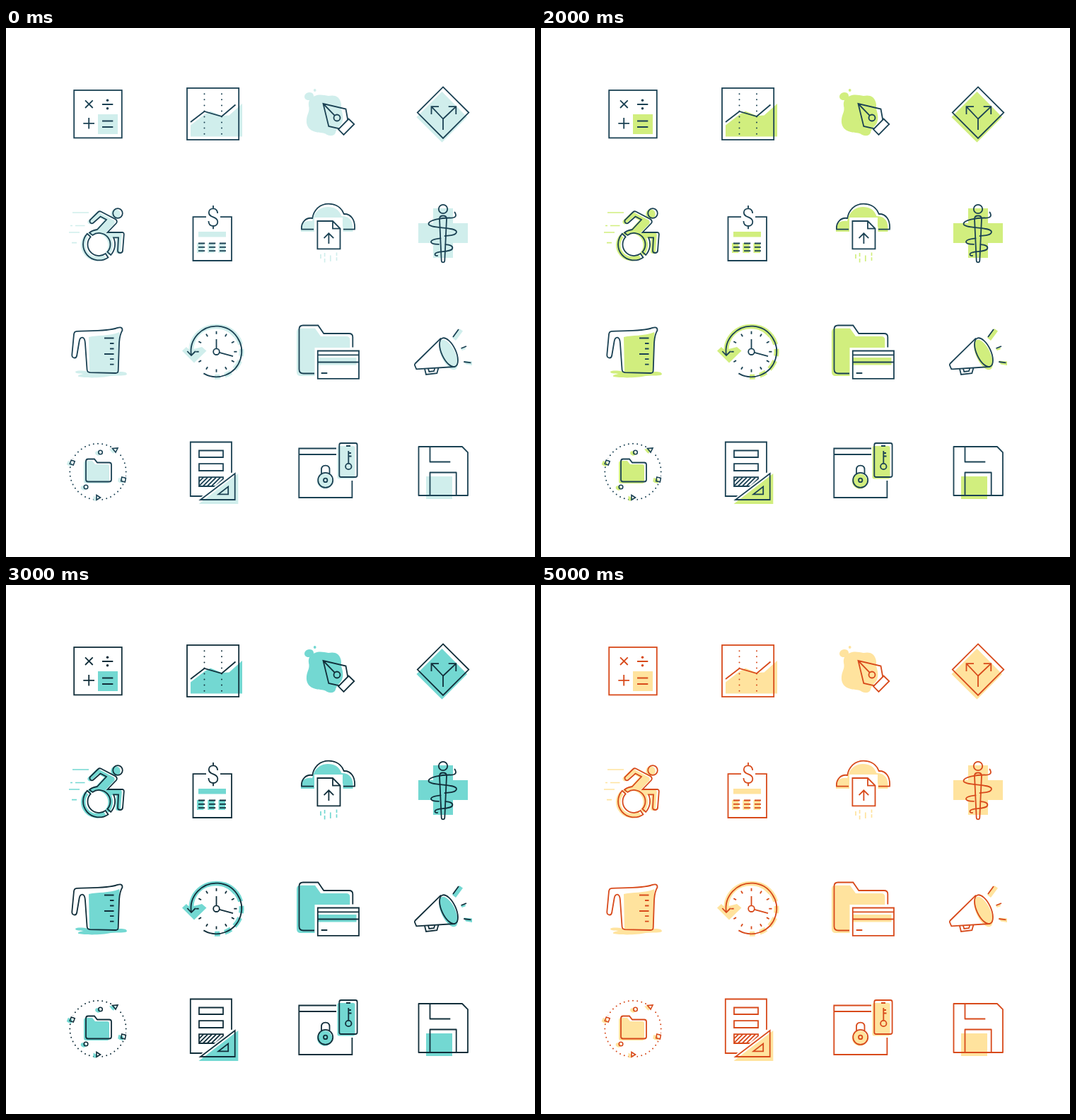
An HTML page that plays this animation: 748 px wide and 748 px high, repeating every 6000 ms.

```html
<!DOCTYPE html>
<html lang="en">
<head>
<meta charset="utf-8">
<title>Icon set colour themes</title>
<style>
  html, body { margin: 0; width: 100%; height: 100%; overflow: hidden; background: #fff; }
  svg { display: block; width: 100%; height: 100%; }
  .line { fill: none; stroke: var(--line); stroke-width: 1.8; }
  .tint { fill: var(--tint); stroke: none; }
  .tint-line { fill: none; stroke: var(--tint); stroke-width: 1.7; }
  .paper { fill: #fff; stroke: none; }
  .dots { stroke-width: 2; stroke-linecap: round; }
  .solid { fill: var(--line); stroke: none; }
  .round { stroke-linejoin: round; stroke-linecap: round; }
</style>
</head>
<body>
<svg id="stage" viewBox="0 0 748 748">
  <defs>
    <path id="chair" d="M122.3 292.9L118 289.5Q122 286 129 285L142 271L133.5 266.5L123.5 275.5Q121 277.5 119 275Q117.5 272.5 119.5 270.8L130 260.5Q132 258.5 134.5 259.8L155 270.5Q158 273 156 276L143.5 289L164 288.8Q167 289 166.8 292L165 315Q164.5 318 161.5 318Q158 318 158 315L159 296.3H152A22.5 22.5 0 0 1 148.2 321L143.4 316.7A16 16 0 0 0 122.3 292.9Z
      M114.8 290.9A22.5 22.5 0 0 0 144.4 324.4L140.7 319.1A16 16 0 0 1 119.6 295.3Z
      M151.2 262a6.8 6.8 0 1 0 13.6 0a6.8 6.8 0 1 0 -13.6 0Z"/>
    <path id="folder" d="M113 613Q113 609.5 116 609.5H125L129 614.5H146Q149 614.5 149 617.5V638.5Q149 641.5 146 641.5H116Q113 641.5 113 638.5Z"/>
    <g id="bits">
      <circle cx="133.5" cy="600" r="2.8"/>
      <circle cx="113" cy="649" r="2.8"/>
      <path d="M150.5 594.5L158 594L155 600Z"/>
      <path d="M128 660.5L133.5 664L128 667.3Z"/>
      <path d="M92.3 611L97.2 612.8L95.2 618L90.2 616.2Z"/>
      <path d="M163.8 635L169.4 636.4L168.3 642L162.7 640.6Z"/>
    </g>
    <clipPath id="field"><rect x="273" y="635" width="34" height="13"/></clipPath>
  </defs>

  <!-- calculator -->
  <rect class="tint" x="130" y="122" width="28" height="28"/>
  <g class="line">
    <rect x="96.2" y="88" width="67.6" height="67.4"/>
    <path d="M112 102.3L122.7 113M122.7 102.3L112 113M136 108H151.3M109.3 134.8H125M117.2 127V142.5M136 131.5H151.3M136 140H151.3"/>
  </g>
  <g class="solid"><circle cx="143.5" cy="102.3" r="1.8"/><circle cx="143.5" cy="113.8" r="1.8"/></g>

  <!-- chart -->
  <path class="tint" d="M261 137.5L281 122L289 117.5L305 124L315.5 123.5L334 107V153.5H261Z"/>
  <g class="line">
    <rect x="256" y="85" width="73.2" height="73"/>
    <path d="M261 133L280.5 118L305 125L324.5 108.5"/>
    <path class="dots" stroke-dasharray="0 8.05" d="M280.5 93.3V150.5M305 93.3V150.5"/>
  </g>

  <!-- pen -->
  <g class="tint">
    <path d="M437 96C443 93 450 95 456 96C465 94 471 97 473 104C475 109 473 112 475 118C477 125 477 131 474 136C470 141 467 143 466 148C464 153 459 153 454 151C449 147 444 149 438 147C429 145 424 139 425 129C426 121 430 118 428 110C427 102 431 98 437 96Z"/>
    <ellipse cx="428.5" cy="96.5" rx="6.6" ry="5.4" transform="rotate(-15 428.5 96.5)"/>
    <circle cx="436.7" cy="88" r="1.9"/>
  </g>
  <path class="paper" d="M484.5 128.5L492.3 136L477.5 151L470 143.3Z"/>
  <g class="line">
    <path d="M483.3 130L480.5 114.5L448.5 107L456.3 139L471.5 142.3M448.5 107L464.6 123.6"/>
    <path d="M484.5 128.5L492.3 136L477.5 151L470 143.3Z"/>
    <circle cx="468" cy="127" r="4.5"/>
  </g>

  <!-- fork sign -->
  <path class="tint" d="M616.5 90L652 126L616.5 161.8L580.5 126Z"/>
  <path class="line" d="M618 83.4L654.3 119.6L618 156L581.8 119.6ZM618 144V128.5L601.5 111.2M618 128.5L636.3 111.2M601.5 122V111.2H612M625.7 111.2H636.3V122"/>

  <!-- wheelchair -->
  <path class="tint-line" d="M94 261H117M91 279.5H94M98 279.5H111.5M89 289H104M93 303.7H100"/>
  <use href="#chair" class="tint" x="-3" y="1"/>
  <use href="#chair" class="line"/>

  <!-- invoice -->
  <path class="tint" d="M272 288H311V295.5H272ZM270 304H279.5V318H270ZM285.3 304H294.8V318H285.3ZM300.5 304H310V318H300.5Z"/>
  <g class="line">
    <path d="M283 267.2H264.5V329H319V267.2H303"/>
    <path d="M272 304.5H311M272 309.8H311M272 315.2H311" stroke-dasharray="9.2 5.8"/>
    <path d="M299.2 262C298.8 257.5 296.5 255.3 293 255.3C289.3 255.3 286.8 257.8 286.8 261C286.8 269 299.3 265.8 299.3 274C299.3 277.6 296.8 280 293 280C289.2 280 286.6 277.5 286.4 273M293 251V255.3M293 280V284.3"/>
  </g>

  <!-- cloud upload -->
  <path class="tint" d="M436 288H417V283C418 275 425 271.5 433 273C436 259 445 253 455 253C465 253 471 257 474.5 266C485 266 490 272 490.5 281V288H476V268H436Z"/>
  <path class="paper" d="M436.3 268.5H463.5L476.5 281.5V316H436.3Z"/>
  <g class="line">
    <path d="M435 284.6H418C417 275 424 267.3 433.2 269C435.5 256 445 248.6 456 248.6C466.5 248.6 474.5 254 477.8 263C487.5 262.5 494 271 493 284.6H477"/>
    <path d="M440.4 273H462L472.5 283.7V312.4H440.4ZM462 273V283.7H472.5M456.4 305V290.5M449.6 297.2L456.4 290.3L463.2 297.2"/>
  </g>
  <path class="tint-line" d="M445 320V326M450.6 318V323.2M450.6 326V331.5M458.8 321.5V330M467.5 317.5V322M467.5 324.2V329"/>

  <!-- medical staff -->
  <path class="tint" d="M604 255H632V276H653V304H632V325H604V304H583V276H604Z"/>
  <g class="line round">
    <circle cx="618" cy="256" r="6.2"/>
    <path d="M613 270Q613 265.5 618 265.5Q623 265.5 623 270L620.3 329Q620 331.4 618 331.4Q616 331.4 615.7 329Z"/>
    <path d="M634.5 260.5C638 266 635.5 269 627 268.5C616 268.5 597.5 271.5 597.5 277C597.5 284 637.5 280.5 637 288.5C636.5 294 624.5 293.2 620.5 294.2M614.5 297.3C607 298 601 299 601 302.5C601 305 605 305.8 612 305.8M621.5 306.2C627.5 306.5 632 308 631.3 311.5C630 318 606.5 314.5 606.5 320C606.5 321.8 608 322.2 610 322"/>
  </g>

  <!-- measuring jug -->
  <g class="tint">
    <path d="M117 437C130 434 145 436 160.5 430L158.5 487H118Z"/>
    <path d="M98 486C101 483.5 110 484.5 115 485.5L158 486C166 485.5 171 486.5 171 489.5C170 492.5 158 491 148 492C136 495 112 495 102.5 493C100 490.5 106 490 110 489C103 488.5 98 488.5 98 486Z"/>
  </g>
  <path class="line round" d="M97 466.5Q93 466.3 93.3 462L96 433Q96.5 429 100 428.8C120 428 145 429 157 424.2Q164.8 421.3 164.5 427.5C160.5 434 160.5 439 160 446L158.7 484.5Q158.5 488 155 488L119 487.2Q115 487 114.6 483L112 446Q111.5 438.2 108 437.7Q104.5 437.5 103.6 443L100.2 463Q99.6 466.5 97 466.5Z"/>
  <path class="line" d="M139 438.5H152.5M147 446H152.5M147 453.5H152.5M139 461H152.5M147 468.2H152.5M147 475.7H152.5"/>

  <!-- history clock -->
  <path class="tint" d="M249 456.5L255 451L258.5 454.5C260 434 276 418.8 297 418.8C311 418.8 321 424 328 433L322 437.5C315 429 307 425.3 297 425.3C279 425.3 267 437 265.5 454L277 451L283.5 456.5L266 473.5Z"/>
  <path d="M325.3 435A36 36 0 0 1 295 493.3" fill="none" stroke="var(--tint)" stroke-width="7" stroke-dasharray="14 6.5 10 7"/>
  <g class="line">
    <path d="M262 463A35.8 35.8 0 1 1 279.4 488.4M256.3 457L262 463L268 457"/>
    <circle cx="297.5" cy="457.7" r="4.3"/>
    <path d="M297.5 440V453.4M301.7 458.8L321 464.2"/>
    <g id="ticks"></g>
  </g>

  <!-- folder with card -->
  <path class="tint" d="M411 430Q411 424.7 416 424.7H437L445 436H481Q486.3 436 486.3 441V452H436.5V492H416.5Q411 492 411 486Z"/>
  <rect class="tint" x="441" y="466" width="54.5" height="10.5"/>
  <g class="line">
    <path d="M436 488.5H420.5Q414.5 488.5 414.5 482.5V426Q414.5 420.5 420 420.5H441.3L449.3 432H485Q490.3 432 490.3 437V451.5"/>
    <path d="M440.8 456.5H499V495.8H440.8ZM440.8 462.3H499M440.8 472.5H499M445.7 488H454.3"/>
  </g>

  <!-- megaphone -->
  <g class="tint">
    <ellipse cx="625.5" cy="462" rx="10" ry="23" transform="rotate(-25 625.5 462)"/>
    <path d="M631 438L641 425L646 428.5L636 442ZM643 454L649 451L650 454L645 456ZM647.5 470.5L659 471.5V477L650 475.5Z"/>
  </g>
  <g class="line">
    <path d="M615 438.6L578.5 474.5Q577.4 475.7 578 477L580.3 482.4L634.5 479"/>
    <ellipse cx="626" cy="458.7" rx="10" ry="22" transform="rotate(-25 626 458.7)"/>
    <path d="M592 482L594 490L609.3 488.2L611.5 480.6M597 481.8L598.3 486L605 485.2L606.3 481.2M632 437L640 426M643.5 453L651 450M647.3 472L657.5 473.3"/>
  </g>

  <!-- orbiting data -->
  <circle class="line dots" cx="130" cy="627.5" r="39.7" pathLength="40" stroke-dasharray="0 1"/>
  <g class="paper"><circle cx="154.5" cy="597" r="6"/><circle cx="93.7" cy="614.5" r="6"/><circle cx="166" cy="638.5" r="6"/><circle cx="130" cy="664" r="6"/></g>
  <use href="#folder" class="tint" x="-3" y="2.5"/>
  <use href="#bits" class="tint" x="-3" y="2"/>
  <use href="#bits" class="tint" x="-4.5" y="1"/>
  <use href="#folder" class="line"/>
  <use href="#bits" class="line" style="stroke-width:1.6"/>

  <!-- form with set square -->
  <g class="line">
    <path d="M278 662H260.8V585.5H319V629"/>
    <path d="M273 597.5H307V607H273ZM273 616.2H307V626H273ZM273 635.2H307V648H273Z"/>
    <g id="hatch" clip-path="url(#field)"></g>
  </g>
  <path class="paper" d="M328 622V671H266Z"/>
  <path class="tint" d="M328.3 630V673H272.5Z"/>
  <path class="line" d="M323.7 630V667H275ZM314.2 648.5V659.3H300.3Z"/>

  <!-- locked window -->
  <path class="tint" d="M440 641a10.7 10.7 0 1 0 21.4 0a10.7 10.7 0 1 0 -21.4 0Z"/>
  <rect class="tint" x="468.5" y="591" width="25" height="46.5" rx="2.5"/>
  <g class="line">
    <path d="M467 594.5H414.3V664H489.4V640M414.3 603H467"/>
    <rect x="471.3" y="587" width="25.3" height="48" rx="2.5"/>
    <path d="M481 591H487M484.3 598V615.6M484.3 601H488M484.3 605.5H488.5"/>
    <circle cx="484.3" cy="620" r="4.2"/>
    <circle cx="451.7" cy="639.4" r="10.5"/>
    <circle cx="451.7" cy="639.4" r="2.7"/>
    <path d="M446 630.5V624.5Q446 618.7 451.8 618.7Q457.5 618.7 457.5 624.5V630.5"/>
  </g>

  <!-- floppy disk -->
  <rect class="tint" x="594" y="634" width="37" height="32"/>
  <path class="line" stroke-linejoin="round" d="M583.5 592H645L653 600.2V661H583.5ZM599.5 592V613.5H628.3M599.5 661V628.5H636.7V661"/>
</svg>
<script>
  const STEP = 1000;
  const themes = [
    ['#1b4254', '#d0eeec'],
    ['#1b4254', '#ffe39e'],
    ['#1b4254', '#d1ee7e'],
    ['#112e3a', '#73d8d2'],
    ['#0a9d93', '#deeae9'],
    ['#d84a1b', '#ffe39e']
  ];
  const stage = document.getElementById('stage');

  function addPath(id, d) {
    const path = document.createElementNS('http://www.w3.org/2000/svg', 'path');
    path.setAttribute('d', d);
    document.getElementById(id).append(path);
  }

  for (let i = 0; i < 12; i++) {
    const a = i * Math.PI / 6, x = Math.sin(a), y = -Math.cos(a);
    addPath('ticks', `M${297.5 + 24.8 * x} ${457.7 + 24.8 * y}L${297.5 + 29 * x} ${457.7 + 29 * y}`);
  }
  for (let x = 266; x < 308; x += 6) addPath('hatch', `M${x} 648.5L${x + 14} 634.5`);

  let shown = -1;
  function draw(time) {
    const index = Math.floor(time / STEP) % themes.length;
    if (index === shown) return;
    shown = index;
    const [line, tint] = themes[index];
    stage.style.setProperty('--line', line);
    stage.style.setProperty('--tint', tint);
  }

  function loop() {
    draw(performance.now());
    requestAnimationFrame(loop);
  }
  loop();
</script>
</body>
</html>
```
